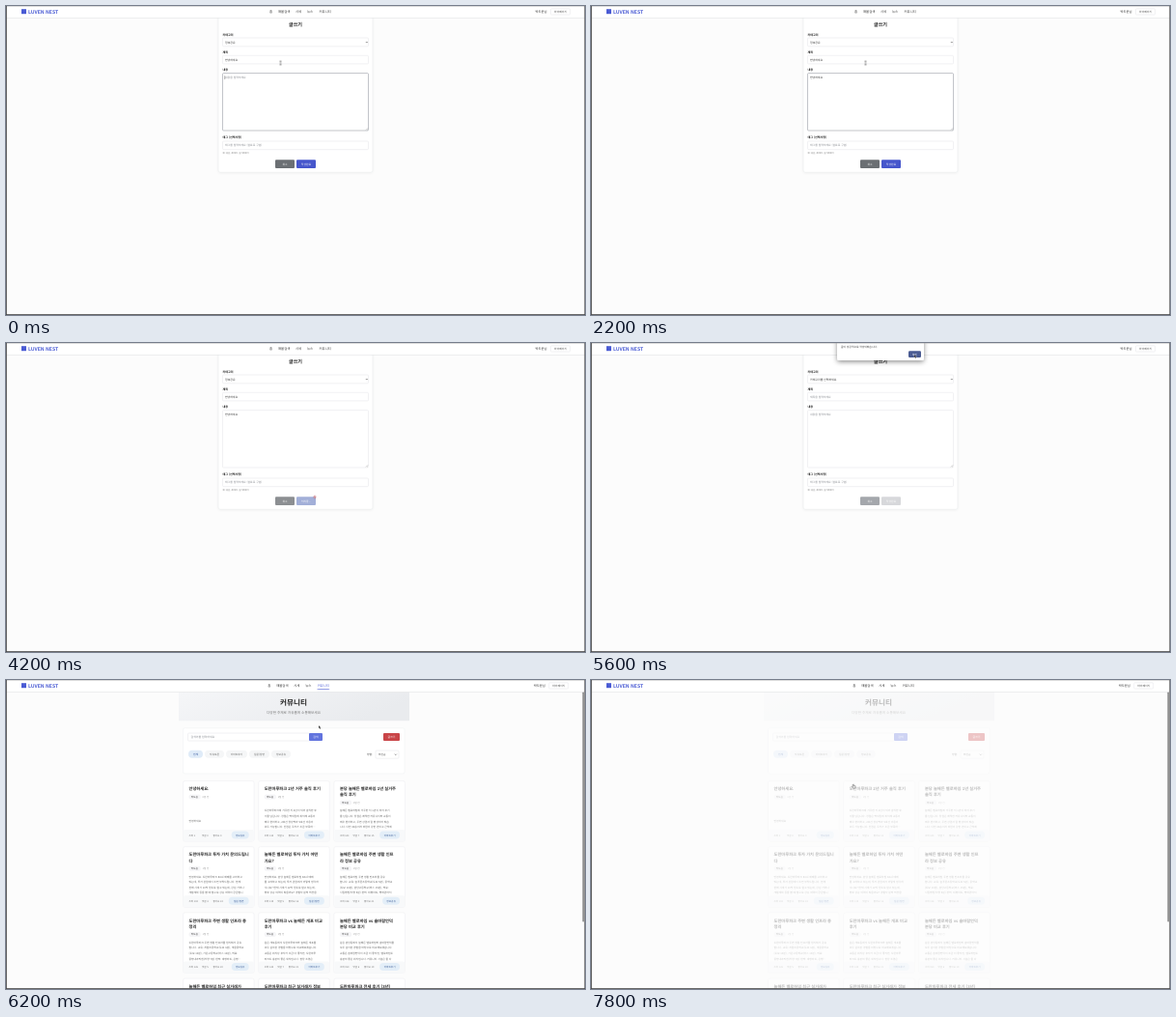
Write an HTML page that moves like this. It is 600x320 px and loops after 8 s.

```html
<!DOCTYPE html>
<html lang="ko">
<head>
<meta charset="utf-8">
<title>글쓰기</title>
<style>
html, body { margin: 0; width: 100%; height: 100%; overflow: hidden; background: #fcfcfc; }
svg { display: block; width: 600px; height: 320px; font-family: "Noto Sans CJK KR", "Noto Sans CJK JP", "Noto Sans", sans-serif; text-rendering: geometricPrecision; }
[class] { animation: 8s step-end infinite; }

.typed { animation-name: typed; }
.caret { animation-name: caret; }
.hint { animation-name: hint; }
.filled { animation-name: filled; }
.reset { animation-name: reset; }
.focus { animation-name: focus; }
.ready { animation-name: ready; }
.busy { animation-name: busy; }
.cancel { animation-name: cancel; }
.submit { animation-name: submit; }
.form { animation-name: form; }
.alert { animation-name: alert; }
.board { animation-name: board; }
.bar { animation-name: bar; }
.shift { animation-name: shift; }
.tab { animation-name: tab; }
.line { animation-name: line; }
.lift { animation-name: lift; }
.glow { animation-name: glow; }
.mouse { animation-name: mouse; }
.beam { animation-name: beam; }
.arrow { animation-name: arrow; }
.stop { animation-name: stop; }
.hand { animation-name: hand; }

@keyframes typed {
  0% { clip-path: inset(0 100% 0 0); } 2.5% { clip-path: inset(0 80% 0 0); } 5% { clip-path: inset(0 60% 0 0); }
  7.5% { clip-path: inset(0 40% 0 0); } 10% { clip-path: inset(0 20% 0 0); } 12.5%, 100% { clip-path: inset(0); }
}
@keyframes caret {
  0% { transform: none; opacity: 1; } 2.5% { transform: translateX(2.6px); } 5% { transform: translateX(5.2px); }
  7.5% { transform: translateX(7.8px); } 10% { transform: translateX(10.4px); } 12.5% { transform: translateX(13.1px); opacity: 1; }
  17.5% { opacity: 0; } 20% { opacity: 1; } 27.5%, 100% { transform: translateX(13.1px); opacity: 0; }
}
@keyframes hint { 0% { opacity: 1; } 2.5% { opacity: 0; } 55%, 100% { opacity: 1; } }
@keyframes filled { 0% { opacity: 1; } 55%, 100% { opacity: 0; } }
@keyframes reset { 0% { opacity: 0; } 55%, 100% { opacity: 1; } }
@keyframes focus { 0% { stroke: #858892; } 45%, 100% { stroke: #e2e3e6; } }
@keyframes ready { 0% { opacity: 1; } 45% { opacity: 0; } 55%, 100% { opacity: 1; } }
@keyframes busy { 0% { opacity: 0; } 45% { opacity: 1; } 55%, 100% { opacity: 0; } }
@keyframes cancel { 0% { fill: #6b6f73; } 45% { fill: #8c8f92; } 55%, 100% { fill: #a4a7ac; } }
@keyframes submit { 0% { fill: #4656cc; } 45% { fill: #a2afd8; } 55%, 100% { fill: #d7d8db; } }
@keyframes form { 0% { opacity: 1; } 72.5% { opacity: .3; } 75%, 100% { opacity: 0; } }
@keyframes alert { 0% { opacity: 0; } 55% { opacity: 1; } 72.5%, 100% { opacity: 0; } }
@keyframes board { 0% { opacity: 0; } 75% { opacity: .45; } 77.5% { opacity: 1; } 97.5%, 100% { opacity: .3; } }
@keyframes bar { 0% { opacity: 0; } 75%, 100% { opacity: 1; } }
@keyframes shift { 0% { transform: none; } 75%, 100% { transform: translateX(-1.8px); } }
@keyframes tab { 0% { fill: #333; } 75% { fill: #4a5bd4; } 97.5%, 100% { fill: #333; } }
@keyframes line { 0% { opacity: 0; } 75% { opacity: 1; } 97.5%, 100% { opacity: 0; } }
@keyframes lift { 0% { transform: none; } 85% { transform: translateY(-1px); } 97.5%, 100% { transform: none; } }
@keyframes glow { 0% { opacity: 0; } 85% { opacity: 1; } 97.5%, 100% { opacity: 0; } }
@keyframes mouse {
  0% { transform: translate(284.5px, 59px); } 30% { transform: translate(288px, 75px); }
  32.5% { transform: translate(296px, 105px); } 35% { transform: translate(304px, 135px); }
  37.5% { transform: translate(309px, 156px); } 40% { transform: translate(311px, 163px); }
  47.5% { transform: translate(318px, 161px); } 50% { transform: translate(320px, 159.5px); }
  57.5% { transform: translate(321px, 140px); } 60% { transform: translate(326px, 100px); }
  62.5% { transform: translate(331px, 55px); } 65% { transform: translate(334px, 25px); }
  67.5% { transform: translate(335px, 12px); } 75% { transform: translate(330px, 30px); }
  77.5% { transform: translate(324px, 47px); } 80% { transform: translate(305px, 66px); }
  82.5% { transform: translate(262px, 100px); } 85% { transform: translate(232.5px, 121px); }
  97.5%, 100% { transform: translate(271.5px, 108px); }
}
@keyframes beam { 0% { opacity: 1; } 37.5%, 100% { opacity: 0; } }
@keyframes arrow { 0% { opacity: 0; } 57.5% { opacity: 1; } 97.5%, 100% { opacity: 0; } }
@keyframes stop { 0% { opacity: 0; } 45% { opacity: 1; } 57.5%, 100% { opacity: 0; } }
@keyframes hand { 0% { opacity: 0; } 37.5% { opacity: 1; } 45% { opacity: 0; } 97.5%, 100% { opacity: 1; } }
</style>
</head>
<body>
<svg id="stage" viewBox="0 0 600 320"></svg>
<script>
const rect = (x, y, w, h, fill, more = '') =>
  `<rect x="${x}" y="${y}" width="${w}" height="${h}" fill="${fill}" ${more}/>`;
const text = (x, y, size, str, fill = '#333', more = '') =>
  `<text x="${x}" y="${y}" font-size="${size}" fill="${fill}" ${more}>${str}</text>`;
const group = (name, body) => `<g class="${name}">${body}</g>`;
const field = (x, y, w, h, more = '') =>
  rect(x, y, w, h, '#fff', `rx="1" stroke="#e2e3e6" stroke-width=".5" ${more}`);
const chevron = (x, y) =>
  `<path d="M${x - 1} ${y - .5}l1 1 1-1" fill="none" stroke="#333" stroke-width=".5"/>`;
const BOLD = 'font-weight="700"', MID = 'text-anchor="middle"', SEMI = 'font-weight="500"';
const USER = '박도윤', GREY = '#8b8e94';

function header() {
  const nav = [[273, '홈'], [282, '매물검색'], [300, '시세'], [312, '뉴스']];
  return rect(0, 0, 600, 12, '#fff') + rect(0, 12, 600, .6, '#e3e4e6') +
    rect(16, 3.2, 5, 5, '#4a5bd4') +
    text(23, 7.8, 5.1, 'LUVEN NEST', '#4a5bd4', BOLD) +
    group('shift',
      nav.map(([x, s]) => text(x, 7.4, 3.35, s, '#333', SEMI)).join('') +
      text(324.5, 7.4, 3.35, '커뮤니티', '#333', SEMI + ' class="tab"') +
      rect(324.5, 9.2, 12.3, .6, '#4a5bd4', 'class="line"') +
      text(548.5, 7.3, 3.3, USER + '님', '#333', SEMI)) +
    group('shift', field(564.5, 2.8, 20, 6.2) + text(574.5, 7, 2.8, '마이페이지', '#444', MID));
}

function form() {
  const label = (y, s) => text(224.5, y, 3, s, '#222', BOLD);
  const hint = (y, s, name) => text(227, y, 2.85, s, GREY, name ? `class="${name}"` : '');
  return rect(220, 10, 160, 162.3, '#fff', 'rx="2" stroke="#ebecee" stroke-width=".7" filter="url(#soft)"') +
    text(300, 20.6, 5.1, '글쓰기', '#222', BOLD + MID) +
    label(30.6, '카테고리') + field(224.5, 33, 151, 8.8) +
    text(227, 38.5, 2.9, '정보공유', '#333', 'class="filled"') +
    text(227, 38.5, 2.9, '카테고리를 선택하세요', '#333', 'class="reset"') + chevron(373.8, 37.5) +
    label(48.9, '제목') + field(224.5, 51.3, 151, 8.6) +
    text(227, 56.8, 2.85, '안녕하세요', '#333', 'class="filled"') + hint(56.8, '제목을 입력하세요', 'reset') +
    label(67.1, '내용') + field(224.5, 69.6, 151, 59.4, 'class="focus"') +
    hint(75.2, '내용을 입력하세요', 'hint') +
    group('filled', text(227, 75.2, 2.85, '안녕하세요', '#333', 'class="typed"')) +
    rect(226.7, 72.3, .4, 3.6, '#222', 'class="caret"') +
    '<path d="M373 128.4l2-2M374.2 128.4l.8-.8" stroke="#777" stroke-width=".35"/>' +
    label(137.3, '태그 (선택사항)') + field(224.5, 140, 151, 8.7) +
    hint(145.4, '태그를 입력하세요 (쉼표로 구분)') +
    text(224.5, 152.7, 2.35, '예: 강남, 재테크, 실거래후기', '#777') +
    rect(279, 159.3, 20, 8.6, '#6b6f73', 'rx="1" class="cancel"') +
    text(289, 164.6, 2.8, '취소', '#fff', MID) +
    rect(301, 159.3, 20, 8.6, '#4656cc', 'rx="1" class="submit"') +
    text(311, 164.6, 2.8, '작성완료', '#fff', MID + ' class="ready"') +
    text(311, 164.6, 2.8, '처리중...', '#fff', MID + ' class="busy"');
}

function alertBox() {
  return rect(255, -6, 90, 24, '#fff', 'rx="2" filter="url(#deep)"') +
    text(259, 4.6, 2.75, '글이 성공적으로 작성되었습니다.') +
    rect(329, 8.3, 13, 6.6, '#4a5b92', 'rx="1.2"') +
    text(335.5, 12.7, 2.7, '확인', '#fff', MID);
}

const A = '도란마루파크', B = '늘해든 벨로하임', C = '솔바람언덕';
const INFO = '정보공유', LIVE = '아파트후기', ASK = '질문/답변';
// title lines, tag, [views, comments, likes], body lines
const posts = [
  [['안녕하세요.'], INFO, [1, 0, 0], ['안녕하세요']],
  [[A + ' 2년 거주 솔직 후기'], LIVE, [134, 6, 12],
    [A + '에 거주한 지 2년이 되어 솔직한 후', '기를 남깁니다. 장점은 역세권에 위치해 교통이', '매우 편리하고, 2호선 정상역과 5호선 이용이', '모두 가능합니다. 단점은 주차가 조금 부족하…']],
  [['분당 ' + B + ' 1년 실거주', '솔직 후기'], LIVE, [143, 7, 15],
    [B + '에 거주한 지 1년이 되어 후기', '를 남깁니다. 장점은 쾌적한 커뮤니티와 교통이', '매우 편리하고, 주변 상권과 잘 형성되어 있습', '니다. 다만 40층이라 바람이 강한 편이고 근처에']],
  [[A + ' 투자 가치 문의드립니', '다'], ASK, [102, 4, 22],
    ['안녕하세요. ' + A + ' 84㎡ 매매를 고려하고', '있는데, 투자 관점에서 조언 부탁드립니다. 현재', '판매 시세가 10억 정도로 알고 있는데, 강남 거리나', '개발계획 등을 볼 때 앞으로 상승 여력이 궁금합니']],
  [[B + ' 투자 가치 어떤', '가요?'], ASK, [119, 5, 16],
    ['안녕하세요. 분당 ' + B + ' 84㎡ 매매', '를 고려하고 있는데, 투자 관점에서 어떻게 생각하', '시나요? 현재 시세가 12억 정도로 알고 있는데,', '향후 상승 여력이 있을까요? 경험자 분의 의견을']],
  [[B + ' 주변 생활 인프', '라 정보 공유'], INFO, [138, 3, 21],
    [B + ' 주변 생활 인프라를 공유', '합니다. 교육: 늘푸른초등학교(도보 5분), 중학교', '(도보 10분), 분당고등학교(버스 15분), 의료:', '시립병원(차량 5분) 편의: 대형마트, 영화관까지']],
  [[A + ' 주변 생활 인프라 총', '정리'], INFO, [126, 5, 20],
    [A + ' 주변 생활 인프라를 정리해서 공유', '합니다. 교육: 개울초등학교(도보 6분), 개울중학교', '(도보 10분), 가온고등학교(버스 10분), 의료:', '중앙내과의원(차량 7분) 편의: 대형마트, 은행…']],
  [[A + ' vs 늘해든 개포 비교', '후기'], LIVE, [144, 7, 21],
    ['같은 개포동에서 ' + A + '와 늘해든 개포를', '모두 살아본 경험을 바탕으로 비교해보겠습니다.', '교통은 위치상 후자가 조금 더 좋지만, 도란마루', '파크도 충분히 좋은 위치입니다. 현장 조경은']],
  [[B + ' vs ' + C, '분당 비교 후기'], LIVE, [150, 8, 19],
    ['같은 분당동에서 ' + B + '와 ' + C + '를', '모두 살아본 경험을 바탕으로 비교해보겠습니다.', '교통은 ' + C + '이 조금 더 좋지만, 벨로하임도', '충분히 좋은 위치입니다. 커뮤니티 시설은 둘 다']],
  [[B + ' 최근 실거래가'], INFO, [98, 2, 9], []],
  [[A + ' 최근 실거래가 정보'], INFO, [97, 3, 8], []],
  [[A + ' 전세 후기 (3년)'], LIVE, [91, 1, 7], []]
];

function card([title, tag, [views, notes, likes], body], i) {
  const x = 183.5 + i % 3 * 78.2, y = 104.5 + Math.floor(i / 3) * 68.2, tx = x + 6;
  const meta = y + (title.length > 1 ? 23.4 : 17.4);
  const tagW = tag === INFO ? 18 : 21;
  const first = y + (body.length > 1 ? 31.8 : 42);
  const face = rect(x, y, 73.6, 62.6, '#fff', 'rx="2" stroke="#eeeff1" stroke-width=".6"');
  const hover = i ? '' : group('glow', rect(x, y, 73.6, 62.6, '#fff', 'rx="2" filter="url(#hover)"'));
  const out = hover + face +
    title.map((s, n) => text(tx, y + 9.6 + n * 6.3, 4.25, s, '#222', BOLD)).join('') +
    rect(tx, meta - 3.4, 12.2, 5, '#f5f5f7', 'rx="2"') +
    text(tx + 2.2, meta, 2.6, USER, '#444', SEMI) +
    text(tx + 14, meta, 2.5, i ? '1일 전' : '0분 전', '#999') +
    body.map((s, n) => text(tx, first + n * 5.6, 2.75, s, '#666')).join('') +
    rect(x + .3, y + 50.5, 73, 11.8, '#f8f9fa', 'rx="1.5"') +
    text(tx, y + 57, 2.5, '조회 ' + views, '#777') +
    text(tx + 13.5, y + 57, 2.5, '댓글 ' + notes, '#777') +
    text(tx + 25, y + 57, 2.5, '좋아요 ' + likes, '#777') +
    rect(x + 68.2 - tagW, y + 52, tagW, 8, '#e3eef8', 'rx="4"') +
    text(x + 68.2 - tagW / 2, y + 57, 2.6, tag, '#40609a', MID + SEMI);
  return i ? out : group('lift', out);
}

function board() {
  const chips = [[189, 15, '전체'], [206, 20, '자유토론'], [228, 22, LIVE], [252, 21, ASK], [275, 20, INFO]];
  return rect(179, 12.5, 239, 29.7, 'url(#hero)') +
    text(298, 26, 7.6, '커뮤니티', '#222', BOLD + MID) +
    text(298, 34.6, 3.6, '다양한 주제로 자유롭게 소통해보세요', '#777', MID) +
    rect(183.5, 49.7, 229.6, 47.3, '#fff', 'rx="2" stroke="#f0f1f3" stroke-width=".6"') +
    field(188.5, 55, 126, 8) + text(191.5, 60.1, 2.9, '검색어를 입력하세요', GREY) +
    rect(314, 55, 14, 8, '#6274de', 'rx="1"') + text(321, 60.1, 2.9, '검색', '#fff', MID + SEMI) +
    rect(391, 55, 17, 8, '#c94548', 'rx="1"') + text(399.5, 60.1, 2.9, '글쓰기', '#fff', MID + SEMI) +
    chips.map(([x, w, s], i) =>
      rect(x, 72.8, w, 8, i ? '#f5f6f7' : '#dfebf8', 'rx="4"') +
      text(x + w / 2, 77.8, 2.7, s, i ? '#666' : '#34549a', MID + SEMI)).join('') +
    text(374, 78.2, 2.7, '정렬:', '#444') + field(383, 73, 24, 8.2) +
    text(386, 78.2, 2.7, '최신순') + chevron(403.8, 77.2) +
    posts.map(card).join('');
}

const pointer = group('mouse',
  '<path class="beam" d="M-.8-2h1.6M0-2v4M-.8 2h1.6" stroke="#333" stroke-width=".5"/>' +
  '<path class="arrow" d="M0 0v3.3l.8-.7.6 1.3.6-.3-.6-1.2h1.1z" fill="#222" stroke="#fff" stroke-width=".2"/>' +
  '<g class="stop"><circle r="1.1" fill="#fff" stroke="#b94a55" stroke-width=".6"/><path d="M-.7-.7l1.4 1.4" stroke="#b94a55" stroke-width=".5"/></g>' +
  '<path class="hand" d="M0 0h.6v1.3l1.7.4v1.5l-.5.9h-1.8l-1.1-1.6.4-.3.7.5z" fill="#fff" stroke="#222" stroke-width=".4"/>');

const shadow = (id, dy, blur, alpha) =>
  `<filter id="${id}" x="-20%" y="-50%" width="140%" height="220%"><feDropShadow dx="0" dy="${dy}" stdDeviation="${blur}" flood-opacity="${alpha}"/></filter>`;

document.getElementById('stage').innerHTML =
  '<defs>' + shadow('soft', .4, 1, .06) + shadow('deep', 1.5, 2.5, .45) + shadow('hover', 1.2, 1.6, .2) +
  '<linearGradient id="hero" x2="1" y2=".3"><stop stop-color="#f5f6f8"/><stop offset="1" stop-color="#e9ebee"/></linearGradient></defs>' +
  rect(0, 0, 600, 320, '#fcfcfc') +
  group('form', form()) + group('board', board()) + header() +
  rect(597.4, 12.5, 1.5, 238, '#858585', 'rx=".7" class="bar"') +
  group('alert', alertBox()) +
  rect(0, 0, 600, .4, '#aaa') + rect(0, 0, .8, 320, '#444') +
  rect(599.3, 0, .7, 320, '#666') + rect(0, 319.2, 600, .8, '#444') + pointer;
</script>
</body>
</html>
```
